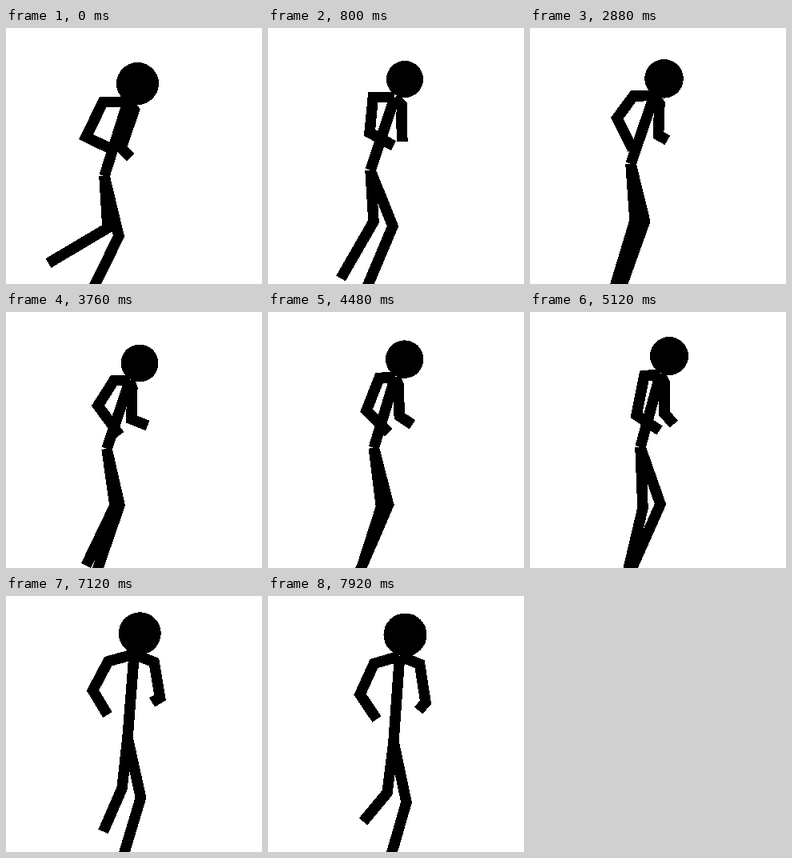
An HTML page that plays this animation: 320 by 320 pixels, repeating every 8 s.

```html
<!DOCTYPE html>
<html lang="en">
<head>
<meta charset="utf-8">
<title>Jogging stick figure</title>
<style>
  html, body { margin: 0; width: 100%; height: 100%; overflow: hidden; background: #fff; }
  svg { display: block; width: 100vw; height: 100vh; shape-rendering: crispEdges; }
  polyline { fill: none; stroke: #000; stroke-width: 13.5; stroke-miterlimit: 3; }
</style>
</head>
<body>
<svg viewBox="0 0 320 320">
  <polyline id="torso"/>
  <polyline id="backArm"/>
  <polyline id="foreArm"/>
  <polyline id="backLeg"/>
  <polyline id="foreLeg"/>
  <circle id="head"/>
</svg>
<script>
const STEP = 80, LOOP = 8000;

// Key poses, by step; every track holds one value per key.
const keys = [0, 10, 26, 47, 64, 79, 99];
const cycles = [1, 2, 2, 2, 2, 2];
const bounce = [9, 3, 4, 4, 2, 14];
const tracks = {
  r:      [26.5, 23, 25, 23.5, 24, 26, 27],
  headX:  [164.5, 171, 168, 167, 174, 163, 171.5],
  headY:  [69.5, 64, 63, 64, 55, 45, 48.5],
  hipX:   [123, 128, 126, 126, 138, 147, 157],
  hipY:   [185, 178, 169, 171, 169, 172, 182],
  backSh: [-31, -27, -31, -20, -20, -33, -32],
  backElX: [100, 127, 101, 115, 133, 102, 115],
  backElY: [136, 131, 109, 117, 129, 113, 123],
  backHaX: [135, 157, 113, 142, 162, 118, 136],
  backHaY: [153, 147, 150, 154, 148, 143, 154],
  foreSh: [8, 9, 10, 3, 5, 25, 25],
  foreElX: [144, 167, 166, 157, 168, 188, 197],
  foreElY: [150, 120, 134, 134, 127, 121, 133],
  foreHaX: [156, 168, 170, 177, 180, 177, 188],
  foreHaY: [162, 142, 139, 142, 140, 123, 143],
  backKnX: [127, 132, 131, 136, 141, 141, 149],
  backKnY: [250, 242, 240, 242, 245, 235, 246],
  backFtX: [53, 91, 119, 100, 121, 124, 119],
  backFtY: [294, 313, 330, 317, 330, 307, 282],
  foreKnX: [141, 156, 141, 142, 163, 164, 173],
  foreFt: [-44, -38, -38, -31, -40, -28, -26]
};

const el = id => document.getElementById(id);
const line = (id, ...pts) => el(id).setAttribute("points", pts.join(" "));

function draw(step) {
  let k = 0;
  while (k < keys.length - 2 && step >= keys[k + 1]) k++;
  const u = (step - keys[k]) / (keys[k + 1] - keys[k]);
  const p = {};
  for (const name in tracks) {
    const [a, b] = tracks[name].slice(k, k + 2);
    p[name] = a + (b - a) * u;
  }

  // Stride on top of the drifting pose; it is zero at each key.
  const phase = 2 * Math.PI * cycles[k] * u;
  const swing = Math.sin(phase);
  const lift = (1 - Math.cos(phase)) / 2;
  const up = bounce[k] * lift;

  const head = [p.headX, p.headY - up];
  const hip = [p.hipX, p.hipY - up];
  const neck = [head[0] * 0.8 + hip[0] * 0.2 - 4, head[1] * 0.8 + hip[1] * 0.2];
  const lean = head[0] - hip[0];
  const foreKn = [p.foreKnX - 7 * swing, hip[1] + 34 + 1.55 * p.r];

  line("torso", neck, hip);
  line("backArm", neck,
    [neck[0] + p.backSh, neck[1] + 14 - lean / 3],
    [p.backElX - 4 * swing, p.backElY - up],
    [p.backHaX - 6 * swing, p.backHaY - up]);
  line("foreArm", neck,
    [neck[0] + p.foreSh, neck[1] + 10],
    [p.foreElX + 4 * swing, p.foreElY - up],
    [p.foreHaX + 5 * swing, p.foreHaY - up]);
  line("backLeg", hip,
    [p.backKnX + 8 * swing, p.backKnY - up],
    [p.backFtX + 13 * swing, p.backFtY - up - 8 * lift]);
  line("foreLeg", hip, foreKn,
    [foreKn[0] + p.foreFt - 8 * swing, foreKn[1] + 90]);

  const circle = el("head");
  circle.setAttribute("cx", head[0]);
  circle.setAttribute("cy", head[1]);
  circle.setAttribute("r", p.r);
}

function tick(now) {
  draw(Math.floor(now % LOOP / STEP));
  requestAnimationFrame(tick);
}
draw(0);
requestAnimationFrame(tick);
</script>
</body>
</html>
```
